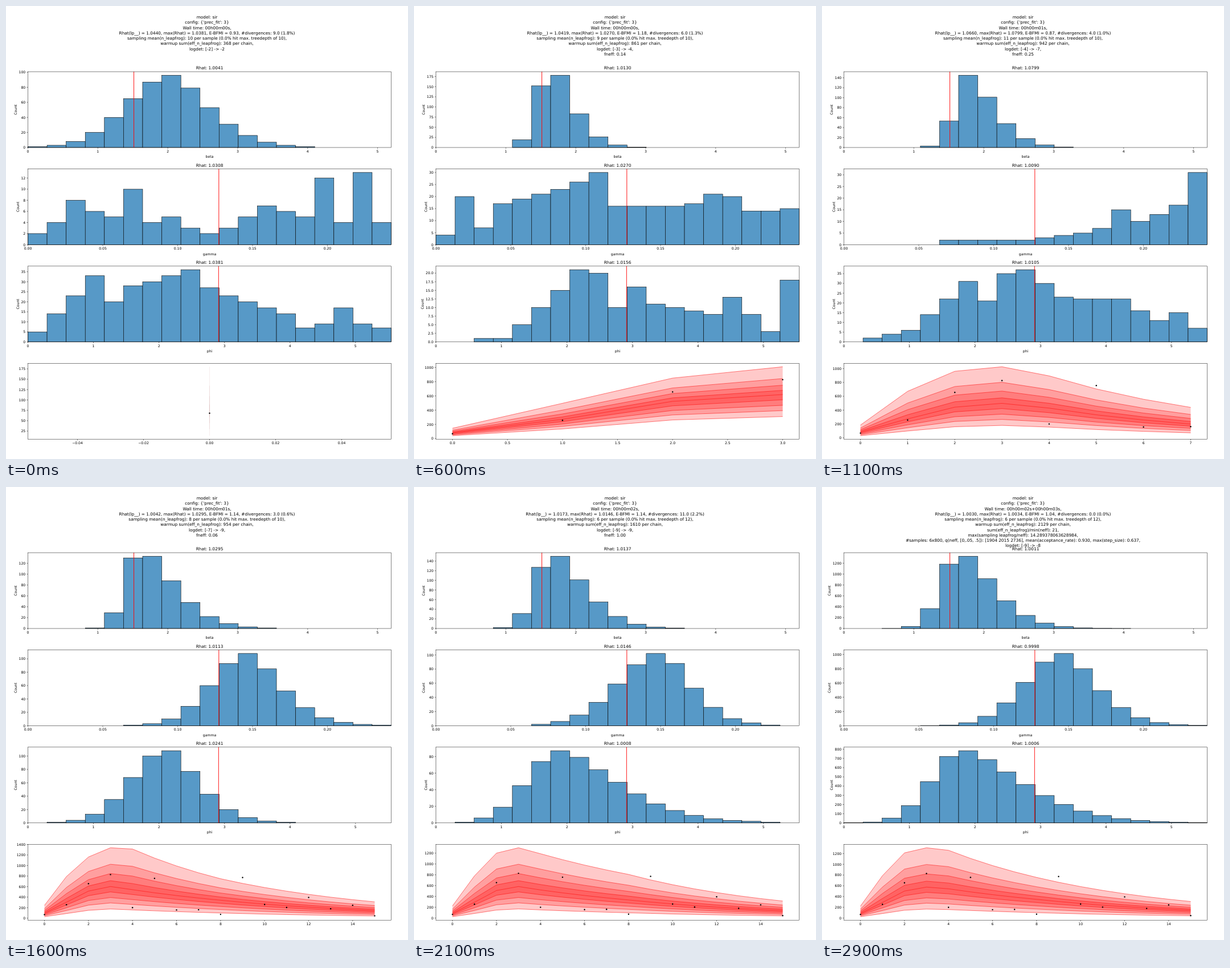
These frames come from a looping animation (706 by 794 pixels, 3100 ms). An HTML page:

```html
<!DOCTYPE html>
<html lang="en">
<head>
<meta charset="utf-8">
<title>Posterior histograms</title>
<style>
html, body { margin: 0; width: 100%; height: 100%; overflow: hidden; background: #fff; }
svg { display: block; width: 706px; height: 794px; }
text { font: 6.128px "DejaVu Sans", sans-serif; text-rendering: geometricPrecision; white-space: pre; }
.title { font-size: 7.354px; }
.mid { text-anchor: middle; }
.end { text-anchor: end; }
.axis { fill: none; stroke: #000; stroke-width: .49; }
.bar { fill: #5799c7; stroke: #000; stroke-width: .61; }
.truth { stroke: #f00; stroke-width: .92; }
.band { fill: #f00; fill-opacity: .21; }
.edge { fill: none; stroke: #f00; stroke-opacity: .55; stroke-width: .92; }
.sliver { stroke: #a04848; stroke-opacity: .2; stroke-width: .5; }
</style>
</head>
<body>
<svg id="stage" viewBox="0 0 706 794"></svg>
<script>
const LEFT = 38.5, WIDTH = 638, HEIGHT = 132.9, BINS = 19, FONT = 6.128;
const MIDDLE = LEFT + WIDTH / 2;
const range = n => [...Array(n).keys()];
const panelTop = row => 115.1 + 170.4 * row;

const PARAMETERS = [
  { name: 'beta', max: 5.195, step: 1, decimals: 0, truth: 1.515 },
  { name: 'gamma', max: .2426, step: .05, decimals: 2, truth: .1275 },
  { name: 'phi', max: 5.545, step: 1, decimals: 0, truth: 2.91 },
];

const OBSERVED = [68, 256, 656, 828, 200, 756, 156, 161, 72, 772, 260, 204, 394, 180, 245, 45];

// Counts of a skewed bell whose sides have their own widths, in bins.
function bell(peak, mode, left, right) {
  const heights = range(BINS).map(i => Math.exp(-(i < mode ? ((mode - i) / left) ** 2 : ((i - mode) / right) ** 1.6)));
  const tallest = Math.max(...heights);
  return heights.map(height => Math.round(peak * (height / tallest)));
}

// Counts along straight lines between [bin, count] points.
function outline(...points) {
  return range(BINS).map(i => {
    const next = points.findIndex(([bin]) => bin >= i);
    const [b, high] = points[next];
    if (b === i) return high;
    if (next === 0) return 0;
    const [a, low] = points[next - 1];
    return Math.floor(low + (high - low) * (i - a) / (b - a));
  });
}

// Epidemic curve through values at the key days, with exponential change between them.
const KEY_DAYS = [0, 1, 2, 3, 4, 8, 15];
function curveAt(values, day) {
  const next = KEY_DAYS.findIndex(key => key >= day);
  if (KEY_DAYS[next] === day) return values[next];
  const a = KEY_DAYS[next - 1], b = KEY_DAYS[next];
  return values[next - 1] * (values[next] / values[next - 1]) ** ((day - a) / (b - a));
}

// Offsets of the quantile curves from the median towards the outer curves.
const UPPER = [1, .575, .335, .15], LOWER = [.24, .49, .73, 1];
function quantiles({ top, median, low }, day) {
  const m = curveAt(median, day), rise = curveAt(top, day) - m, drop = m * (low - 1);
  return [...UPPER.map(r => m + r * rise), m, ...LOWER.map(r => m + r * drop)];
}

const intro = time => ['model: sir', "config: {'prec_fit': 3}", `Wall time: ${time},`];
const stats = (lp, max, bfmi, divergences, leapfrog, depth, warmup) => [
  `Rhat(lp__) = ${lp}, max(Rhat) = ${max}, E-BFMI = ${bfmi}, #divergences: ${divergences}`,
  `sampling mean(n_leapfrog): ${leapfrog} per sample (0.0% hit max. treedepth of ${depth}),`,
  `warmup sum(eff_n_leapfrog): ${warmup} per chain,`,
];

// hists: Rhat, y tick step, counts
const STATES = [
  {
    head: [...intro('00h00m00s'), ...stats('1.0440', '1.0381', '0.93', '9.0 (1.8%)', 10, 10, 368), 'logdet: [-2] -> -2'],
    hists: [
      ['1.0041', 20, bell(96, 7, 3.2, 2.76)],
      ['1.0308', 2, outline([0, 2], [1, 4], [2, 8], [4, 5], [5, 10], [6, 4], [7, 5], [9, 2], [12, 7], [14, 5], [15, 12], [16, 4], [17, 13], [18, 4])],
      ['1.0381', 5, outline([0, 5], [3, 33], [4, 20], [5, 28], [8, 36], [9, 27], [13, 14], [14, 7], [15, 9], [16, 17], [17, 9], [18, 7])],
    ],
    fan: { days: 0, xStep: .02, decimals: 2, yStep: 25, low: .19, top: [180], median: [73] },
  },
  {
    head: [...intro('00h00m00s'), ...stats('1.1198', '1.0909', '0.86', '15.0 (6.0%)', 12, 10, 787), 'logdet: [-2] -> -3,', 'fneff: 0.62'],
    hists: [
      ['1.0627', 10, bell(60, 7, 2.3, 2.4)],
      ['1.0909', 1, outline([0, 5], [1, 6], [3, 4], [5, 1], [6, 6], [7, 2], [9, 5], [10, 0], [11, 4], [12, 5], [14, 3], [15, 0], [16, 5], [18, 2])],
      ['1.0650', 2.5, outline([1, 1], [2, 11], [3, 7], [5, 17], [6, 17], [7, 12], [9, 18], [10, 11], [12, 5], [13, 9], [18, 4])],
    ],
    fan: { days: 1, xStep: .2, decimals: 1, yStep: 100, low: .345, top: [185, 479], median: [81, 212] },
  },
  {
    head: [...intro('00h00m00s'), ...stats('1.0419', '1.0270', '1.18', '6.0 (1.3%)', 9, 10, 861), 'logdet: [-3] -> -4,', 'fneff: 0.14'],
    hists: [
      ['1.0130', 25, bell(178, 5.55, 1.01, 1.55)],
      ['1.0270', 5, outline([0, 4], [1, 20], [2, 7], [3, 17], [6, 23], [8, 30], [9, 16], [13, 17], [14, 21], [15, 20], [16, 14], [18, 15])],
      ['1.0156', 2.5, outline([2, 1], [3, 1], [4, 5], [6, 15], [7, 21], [8, 20], [9, 10], [10, 16], [11, 11], [14, 8], [15, 13], [17, 3], [18, 18])],
    ],
    fan: { days: 3, xStep: .5, decimals: 1, yStep: 200, low: .5, top: [145, 496, 850, 1009], median: [81, 271, 523, 619] },
  },
  {
    head: [...intro('00h00m01s'), ...stats('1.0660', '1.0799', '0.87', '4.0 (1.0%)', 11, 10, 942), 'logdet: [-4] -> -7,', 'fneff: 0.25'],
    hists: [
      ['1.0799', 20, bell(145, 6, 1, 1.88)],
      ['1.0090', 5, outline([5, 2], [9, 2], [12, 5], [13, 7], [14, 15], [15, 10], [17, 17], [18, 31])],
      ['1.0105', 5, outline([0, 0], [3, 6], [6, 31], [7, 21], [8, 35], [9, 37], [11, 23], [14, 22], [16, 11], [17, 15], [18, 7])],
    ],
    fan: {
      days: 7, xStep: 1, decimals: 0, yStep: 200, low: .36,
      top: [184, 672, 962, 1027, 895, 347], median: [84, 273, 443, 498, 429, 154],
    },
  },
  {
    head: [...intro('00h00m01s'), ...stats('1.0042', '1.0295', '1.14', '3.0 (0.6%)', 8, 10, 954), 'logdet: [-7] -> -9,', 'fneff: 0.06'],
    hists: [
      ['1.0295', 20, bell(133, 5.4, 1.1, 2.4)],
      ['1.0113', 20, bell(108, 11, 2.6, 2.45)],
      ['1.0241', 20, bell(108, 6.8, 2.6, 2.3)],
    ],
    fan: {
      days: 15, xStep: 2, decimals: 0, yStep: 200, low: .29,
      top: [243, 791, 1162, 1337, 1313, 749, 310], median: [97, 303, 514, 601, 541, 341, 145],
    },
  },
  {
    head: [...intro('00h00m02s'), ...stats('1.0173', '1.0146', '1.14', '11.0 (2.2%)', 6, 12, 1610), 'logdet: [-9] -> -9,', 'fneff: 1.00'],
    hists: [
      ['1.0137', 20, bell(150, 5.6, 1.25, 2.3)],
      ['1.0146', 20, bell(102, 11.3, 3.1, 2.2)],
      ['1.0008', 20, bell(87, 6, 2.45, 4.2)],
    ],
    fan: {
      days: 15, xStep: 2, decimals: 0, yStep: 200, low: .29,
      top: [224, 780, 1201, 1300, 1190, 807, 315], median: [87, 292, 509, 583, 520, 335, 139],
    },
  },
  {
    head: [...intro('00h00m02s+00h00m03s'), ...stats('1.0030', '1.0034', '1.04', '0.0 (0.0%)', 6, 12, 2129),
      'sum(eff_n_leapfrog)/min(neff): 21,', 'max(sampling leapfrog/neff): 14.289378063628984,',
      '#samples: 6x800, q(neff, [0,.05, .5]): [1904 2015 2736], mean(acceptance_rate): 0.930, max(step_size): 0.637,',
      'logdet: [-9] -> -8'],
    hists: [
      ['1.0011', 200, bell(1328, 5.57, 1.35, 2.4)],
      ['0.9998', 200, bell(1013, 11, 2.8, 2.45)],
      ['1.0006', 100, bell(784, 5.7, 2.25, 4.34)],
    ],
    fan: {
      days: 15, xStep: 2, decimals: 0, yStep: 200, low: .29,
      top: [223, 788, 1212, 1307, 1260, 756, 308], median: [88, 290, 502, 576, 544, 348, 146],
    },
  },
];

const text = (x, y, label, kind, extra = '') => `<text x="${x}" y="${y}" class="${kind}" ${extra}>${label}</text>`;
const path = (kind, d) => `<path class="${kind}" d="${d}"/>`;
const rect = (kind, x, y, w, h) => `<rect class="${kind}" x="${x}" y="${y}" width="${w}" height="${h}"/>`;
const number = (value, decimals) => value.toFixed(decimals).replace('-', '\u2212');
const scale = (low, high, from, to) => value => from + (value - low) / (high - low) * (to - from);

function ticks(low, high, step) {
  const first = Math.ceil(low / step), last = Math.floor(high / step);
  return range(last - first + 1).map(i => (first + i) * step);
}

// Frame, ticks and tick labels of one panel.
function axes(top, toX, xTicks, xDecimals, toY, yTicks, yDecimals) {
  const bottom = top + HEIGHT;
  return rect('axis', LEFT, top, WIDTH, HEIGHT)
    + xTicks.map(value => path('axis', `M${toX(value)} ${bottom}v2.15`)
      + text(toX(value), bottom + 8.8, number(value, xDecimals), 'mid')).join('')
    + yTicks.map(value => path('axis', `M${LEFT} ${toY(value)}h-2.15`)
      + text(LEFT - 4.3, toY(value) + 2.24, number(value, yDecimals), 'end')).join('');
}

function histogram([rhat, step, counts], row) {
  const { name, max, step: xStep, decimals: xDecimals, truth } = PARAMETERS[row];
  const top = panelTop(row), bottom = top + HEIGHT, middle = top + HEIGHT / 2;
  const limit = Math.max(...counts) * 1.05, binWidth = WIDTH / BINS;
  const toX = scale(0, max, LEFT, LEFT + WIDTH), toY = scale(0, limit, bottom, top);
  const yTicks = ticks(0, limit, step), decimals = step % 1 ? 1 : 0;
  const digits = String(Math.floor(yTicks.at(-1))).length;
  const countX = LEFT - 7.95 - FONT * (.636 * digits + .954 * decimals);
  const bars = counts.map((count, i) => count
    ? rect('bar', LEFT + i * binWidth, toY(count), binWidth, bottom - toY(count)) : '');
  return bars.join('')
    + path('truth', `M${toX(truth)} ${top}V${bottom}`)
    + axes(top, toX, ticks(0, max, xStep), xDecimals, toY, yTicks, decimals)
    + text(MIDDLE, top - 3.7, `Rhat: ${rhat}`, 'title mid')
    + text(MIDDLE, bottom + 18.2, name, 'mid')
    + text(countX, middle, 'Count', 'mid', `transform="rotate(-90 ${countX} ${middle})"`);
}

function forecast(fan) {
  const { days, xStep, decimals, yStep } = fan;
  const top = panelTop(3);
  const columns = range(days + 1).map(day => quantiles(fan, day));
  const min = Math.min(...columns.flat()), max = Math.max(...columns.flat()), margin = (max - min) * .05;
  const xLimits = days ? [-.05 * days, 1.05 * days] : [-.055, .055];
  const yLimits = [min - margin, max + margin];
  const toX = scale(...xLimits, LEFT, LEFT + WIDTH), toY = scale(...yLimits, top + HEIGHT, top);
  const curves = range(9).map(q => columns.map((column, day) => [toX(day), toY(column[q])]));
  const bands = range(4).map(q =>
    path(days ? 'band' : 'sliver', `M${curves[q].join('L')}L${[...curves[8 - q]].reverse().join('L')}`));
  const edges = days ? curves.map(points => path('edge', `M${points.join('L')}`)) : [];
  const dots = columns.map((_, day) => `<circle cx="${toX(day)}" cy="${toY(OBSERVED[day])}" r="1.2"/>`);
  return [...bands, ...edges, ...dots].join('')
    + axes(top, toX, ticks(...xLimits, xStep), decimals, toY, ticks(...yLimits, yStep), 0);
}

const stage = document.getElementById('stage');
stage.innerHTML = STATES.map(({ head, hists, fan }) => '<g>'
  + head.map((line, i) => text(353, 22.1 + 9.26 * i, line, 'title mid')).join('')
  + hists.map(histogram).join('')
  + forecast(fan) + '</g>').join('');

function show() {
  const time = performance.now() % 3100;
  const current = time < 100 ? 0 : 1 + Math.floor((time - 100) / 500);
  [...stage.children].forEach((group, i) => { group.style.display = i === current ? '' : 'none'; });
  requestAnimationFrame(show);
}
show();
</script>
</body>
</html>
```
